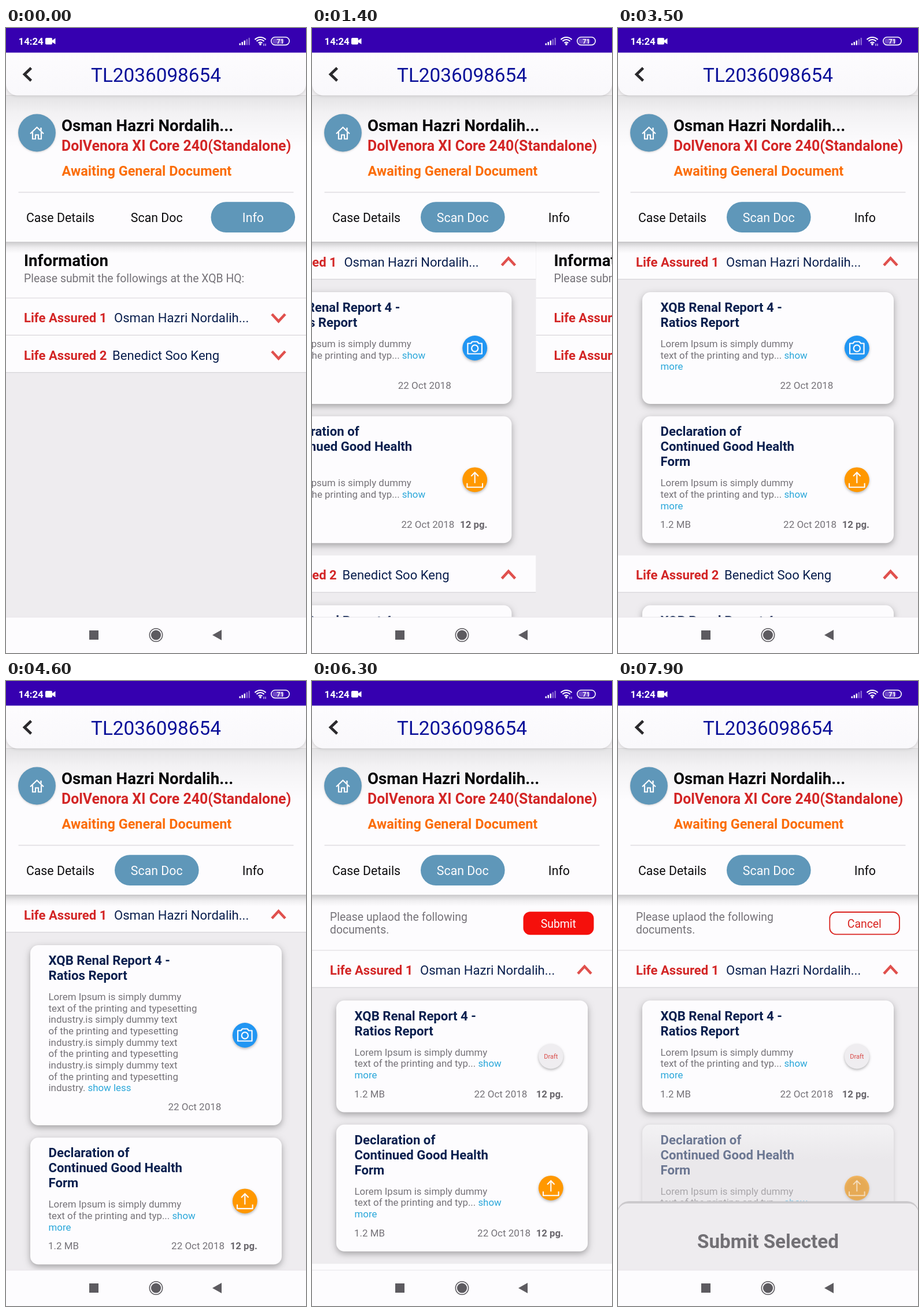
An HTML page with a canvas that plays this animation: 519x1079 px, repeating every 8000 ms.

```html
<!DOCTYPE html>
<html lang="en">
<head>
<meta charset="utf-8">
<title>Case documents</title>
<style>
html, body { margin: 0; width: 100%; height: 100%; overflow: hidden; background: #eeecef; }
canvas { display: block; width: 519px; height: 1079px; }
</style>
</head>
<body>
<canvas id="stage"></canvas>
<script>
const W = 519, H = 1079, LOOP = 8000;
const canvas = document.getElementById('stage');
const ratio = window.devicePixelRatio || 1;
canvas.width = W * ratio;
canvas.height = H * ratio;
const c = canvas.getContext('2d');

const WHITE = '#fdfcfe', GREY = '#eeecef', LINE = '#d9d7db', NAVY = '#0a1f4e',
  RED = '#d32626', BLUE = '#5f97b9', TEXT = '#757278', LINK = '#2aa7da', CHEVRON = '#e0504d';
const PERSON_1 = 'Osman Hazri Nordalih...', PERSON_2 = 'Benedict Soo Keng';
const SERUM = ['XQB Renal Report 4 -', 'Ratios Report'];
const HEALTH = ['Declaration of', 'Continued Good Health', 'Form'];
const FILLER = ['industry.is simply dummy text', 'of the printing and typesetting'];
const SHORT = ['Lorem Ipsum is simply dummy', 'text of the printing and typ... |show', '|more'];
const LONG = ['Lorem Ipsum is simply dummy', 'text of the printing and typesetting',
  ...FILLER, ...FILLER, ...FILLER, 'industry. |show less'];

// Moments of the story, in ms
const SLIDE = 1281, SLIDE_TIME = 500, OPEN = 3600, CLOSE = 4900, DRAFT = 5800, SELECT = 7200, SHEET_TIME = 250;

const clamp = v => Math.max(0, Math.min(1, v));

function text(s, x, y, size, color, weight = 400, align = 'left') {
  c.font = `${weight} ${size}px Roboto, "Noto Sans", sans-serif`;
  c.fillStyle = color;
  c.textAlign = align;
  c.fillText(s, x, y);
  return c.measureText(s).width;
}

function rect(x, y, w, h, color) {
  c.fillStyle = color;
  c.fillRect(x, y, w, h);
}

function round(x, y, w, h, r) {
  c.beginPath();
  c.roundRect(x, y, w, h, r);
}

function disc(x, y, r, color) {
  c.beginPath();
  c.arc(x, y, r, 0, Math.PI * 2);
  c.fillStyle = color;
  c.fill();
}

function poly(points, color, width, close) {
  c.beginPath();
  points.forEach(([x, y]) => c.lineTo(x, y));
  if (close) c.closePath();
  if (width) {
    c.strokeStyle = color;
    c.lineWidth = width;
    c.stroke();
  } else {
    c.fillStyle = color;
    c.fill();
  }
}

function fade(y, h, stops) {
  const g = c.createLinearGradient(0, y, 0, y + h);
  stops.forEach((s, i) => g.addColorStop(i / (stops.length - 1), s));
  return g;
}

function shadow(blur, dy, alpha) {
  c.shadowColor = `rgba(0,0,0,${alpha})`;
  c.shadowBlur = blur * ratio;
  c.shadowOffsetY = dy * ratio;
}

function noShadow() { c.shadowColor = 'transparent'; }

function chevron(y, up) {
  const d = up ? 6.2 : -6.2;
  poly([[460, y + d], [471.5, y - d], [483, y + d]], CHEVRON, 4.6);
}

function personRow(y, n, name, up) {
  rect(0, y, W, 63.5, WHITE);
  rect(0, y + 63, W, 1.4, LINE);
  text('Life Assured ' + n, 31, y + 41.5, 22.1, RED, 700);
  text(name, n === 1 ? 187 : 184, y + 41.5, 22.1, NAVY);
  chevron(y + 33.5, up);
}

function camera(y) {
  c.strokeStyle = WHITE;
  c.lineWidth = 2.2;
  c.lineJoin = 'round';
  poly([[401, y - 8], [406.5, y - 8], [409, y - 11], [417.5, y - 11], [420, y - 8],
    [425.5, y - 8], [425.5, y + 10], [401, y + 10]], WHITE, 2.2, true);
  c.lineJoin = 'miter';
  c.beginPath();
  c.arc(413.3, y + 0.5, 5.6, 0, Math.PI * 2);
  c.stroke();
}

function upload(y) {
  poly([[413.3, y + 6], [413.3, y - 12]], WHITE, 2.1);
  poly([[407, y - 6], [413.3, y - 12.5], [419.6, y - 6]], WHITE, 2.1);
  poly([[400, y + 6], [400, y + 13], [426.6, y + 13], [426.6, y + 6]], WHITE, 2.1);
}

function badge(kind, y) {
  shadow(4, 2, 0.28);
  disc(413.3, y, 21.4, { camera: '#2196f3', upload: '#ff9800', draft: '#efedf0' }[kind]);
  noShadow();
  if (kind === 'camera') camera(y);
  if (kind === 'upload') upload(y);
  if (kind === 'draft') text('Draft', 413.3, y + 3.8, 11.1, '#d94b48', 400, 'center');
}

// Draws one document card and returns its height
function card(y, doc) {
  const { title, lines, kind, pages, dim } = doc;
  const first = 95 + 26 * (title.length - 2);
  const last = first + 19.67 * lines.length + 13;
  const h = last + 26;
  round(42, y, 435, h, 14);
  shadow(dim ? 7 : 12, dim ? 1 : 4, dim ? 0.14 : 0.32);
  c.fillStyle = dim ? fade(y, 60, ['#f3f2f4', '#eae8eb']) : WHITE;
  c.fill();
  noShadow();
  c.globalAlpha = dim ? 0.57 : 1;
  title.forEach((s, i) => text(s, 73.5, y + 34 + i * 26, 22.2, NAVY, 700));
  lines.forEach((line, i) => {
    const [plain, link = ''] = line.split('|');
    const base = y + first + i * 19.67;
    const w = text(plain, 73.5, base, 16.87, TEXT);
    text(link, 73.5 + w, base, 16.87, LINK);
  });
  if (pages) {
    text('1.2 MB', 73, y + last, 16.9, TEXT);
    text('12 pg.', 435, y + last, 16.8, '#69666c', 700, 'right');
  }
  text('22 Oct 2018', kind === 'upload' ? 378 : 372.3, y + last, 17, TEXT, 400, 'right');
  badge(kind, y + h / 2);
  c.globalAlpha = 1;
  return h;
}

function uploadBar(selecting) {
  rect(0, 369, W, 96, WHITE);
  rect(0, 464.5, W, 1.4, LINE);
  text('Please uplaod the following', 31, 414, 19.4, TEXT);
  text('documents.', 31, 436.3, 19.4, TEXT);
  if (selecting) {
    round(366.3, 399, 120.6, 38.4, 11);
    c.fillStyle = WHITE;
    c.fill();
    c.strokeStyle = '#d9231f';
    c.lineWidth = 1.8;
    c.stroke();
  } else {
    round(365.5, 398.2, 122, 40, 12);
    c.fillStyle = '#f5100c';
    c.fill();
  }
  text(selecting ? 'Cancel' : 'Submit', 426.3, 425.8, 19.4, selecting ? '#d9231f' : WHITE, 400, 'center');
}

function scanPage(t) {
  const draft = t >= DRAFT, selecting = t >= SELECT;
  const lines = t >= OPEN && t < CLOSE ? LONG : SHORT;
  let y = 370;
  if (draft) {
    uploadBar(selecting);
    y += 95.5;
  }
  personRow(y, 1, PERSON_1, true);
  y += 86;
  y += card(y, { title: SERUM, lines, kind: draft ? 'draft' : 'camera', pages: draft }) + 21.3;
  y += card(y, { title: HEALTH, lines: SHORT, kind: 'upload', pages: true, dim: selecting }) + 21.3;
  personRow(y, 2, PERSON_2, true);
  card(y + 86, { title: SERUM, lines: SHORT, kind: 'camera' });
}

function infoPage() {
  rect(0, 369, W, 226, WHITE);
  text('Information', 31, 411, 27.7, '#050507', 700);
  text('Please submit the followings at the XQB HQ:', 31, 439, 19.4, TEXT);
  rect(0, 465.6, W, 1.4, LINE);
  personRow(466.7, 1, PERSON_1, false);
  personRow(531, 2, PERSON_2, false);
}

// Draws a full-width page shifted sideways, kept inside its own bounds
function shifted(x, page) {
  if (Math.abs(x) >= W) return;
  c.save();
  c.translate(x, 0);
  c.beginPath();
  c.rect(0, 369, W, 648);
  c.clip();
  page();
  c.restore();
}

function pages(t) {
  const u = clamp((t - SLIDE) / SLIDE_TIME);
  const shift = W * (1 - Math.pow(1 - u, 5));
  c.save();
  c.beginPath();
  c.rect(0, 369, W, 648);
  c.clip();
  rect(0, 369, W, 648, GREY);
  shifted(shift, infoPage);
  shifted(shift - W, () => scanPage(t));
  rect(0, 369, W, 20, fade(369, 20, ['rgba(0,0,0,.2)', 'rgba(0,0,0,.06)', 'rgba(0,0,0,0)']));
  if (t >= SELECT) sheet((t - SELECT) / SHEET_TIME);
  c.restore();
}

function sheet(p) {
  const y = 898 + 119 * Math.pow(1 - clamp(p), 2);
  round(-1, y, W + 2, 140, 20);
  c.fillStyle = '#cbc9cc';
  c.fill();
  round(-1, y + 4, W + 2, 140, 18);
  c.fillStyle = GREY;
  c.fill();
  text('Submit Selected', W / 2, y + 81, 33.2, '#727075', 700, 'center');
}

function wifi(busy) {
  c.strokeStyle = '#fff';
  c.lineWidth = 2.2;
  for (const r of [4.5, 9, 13]) {
    c.beginPath();
    c.arc(440, 29, r, -Math.PI * 0.76, -Math.PI * 0.24);
    c.stroke();
  }
  disc(440, 28, 1.9, '#fff');
  if (busy) {
    poly([[446, 27], [446, 31]], '#fff', 1);
    poly([[449, 27], [449, 31]], '#fff', 1);
  }
}

function statusBar(t) {
  rect(0, 0, W, 42.5, '#3600b0');
  text('14:24', 21.5, 28.8, 16.8, '#fff', 700);
  round(68, 17, 12, 11.5, 2);
  c.fillStyle = '#fff';
  c.fill();
  poly([[79, 22], [85.5, 17.5], [85.5, 28], [79, 24]], '#fff');
  for (let i = 0; i < 5; i++) {
    const h = 3 + i * 2.4;
    rect(403.5 + i * 4, 29.5 - h, 2.5, h, i < 3 ? '#fff' : 'rgba(255,255,255,.4)');
  }
  wifi(t < 1300 || (t >= 3300 && t < 5000) || (t >= 6000 && t < 7300));
  round(458.8, 15.8, 31.4, 13.6, 6.8);
  c.strokeStyle = '#fff';
  c.lineWidth = 1.6;
  c.stroke();
  round(461, 18, 20, 9.2, 4);
  c.fillStyle = 'rgba(255,255,255,.28)';
  c.fill();
  text('71', 474.5, 26.6, 11, '#fff', 700, 'center');
}

function home() {
  shadow(3, 1, 0.2);
  disc(53.5, 181, 32.4, BLUE);
  noShadow();
  poly([[42, 182.5], [53.5, 171.5], [65, 182.5]], WHITE, 2.2);
  poly([[46, 180], [46, 191.5], [51, 191.5], [51, 184.5], [56, 184.5], [56, 191.5],
    [61, 191.5], [61, 180]], WHITE, 2.2);
  poly([[60.5, 172], [60.5, 177]], WHITE, 2.4);
}

function header(t) {
  rect(0, 42, W, 327, WHITE);
  rect(0, 42, W, 75, '#eeecee');
  rect(0, 116, W, 90, fade(116, 90, ['rgba(0,0,0,.1)', 'rgba(0,0,0,.045)', 'rgba(0,0,0,.018)', 'rgba(0,0,0,0)']));
  round(0, 30, W, 86.5, [0, 0, 20, 20]);
  shadow(5, 1, 0.13);
  c.fillStyle = fade(42, 75, [WHITE, '#f9f8fb']);
  c.fill();
  noShadow();
  poly([[43.5, 69], [32, 80], [43.5, 91]], '#2a292c', 4.6);
  text('TL2036098654', W / 2, 93, 33.3, '#0a1099', 400, 'center');

  home();
  text(PERSON_1, 96, 178, 27.7, '#050507', 700);
  text('DolVenora XI Core 240(Standalone)', 96, 212.3, 24.9, RED, 700);
  text('Awaiting General Document', 96.5, 255, 23.5, '#fb6d08', 700);
  rect(21.5, 282.8, 476, 1.6, '#dfdde1');

  const active = t >= SLIDE ? 1 : 2;
  round(active === 1 ? 188 : 354.5, 300.3, 145.6, 52.6, 26.3);
  c.fillStyle = BLUE;
  c.fill();
  ['Case Details', 'Scan Doc', 'Info'].forEach((s, i) =>
    text(s, 94 + i * 166.7, 335, 21.3, i === active ? WHITE : '#0d0c0e', 400, 'center'));
}

function navBar() {
  const ink = '#5d5b60';
  rect(0, 1017, W, 62, WHITE);
  rect(0, 1016.6, W, 1, '#e6e4e8');
  rect(144, 1040, 16, 16, ink);
  disc(259.5, 1048, 8.6, ink);
  c.beginPath();
  c.arc(259.5, 1048, 11.2, 0, Math.PI * 2);
  c.strokeStyle = ink;
  c.lineWidth = 1.5;
  c.stroke();
  poly([[357, 1048], [373, 1039], [373, 1057]], ink);
}

function draw(t) {
  c.setTransform(ratio, 0, 0, ratio, 0, 0);
  pages(t);
  header(t);
  statusBar(t);
  navBar();
}

const start = performance.now();
function frame() {
  draw((performance.now() - start) % LOOP);
  requestAnimationFrame(frame);
}
frame();
</script>
</body>
</html>
```
